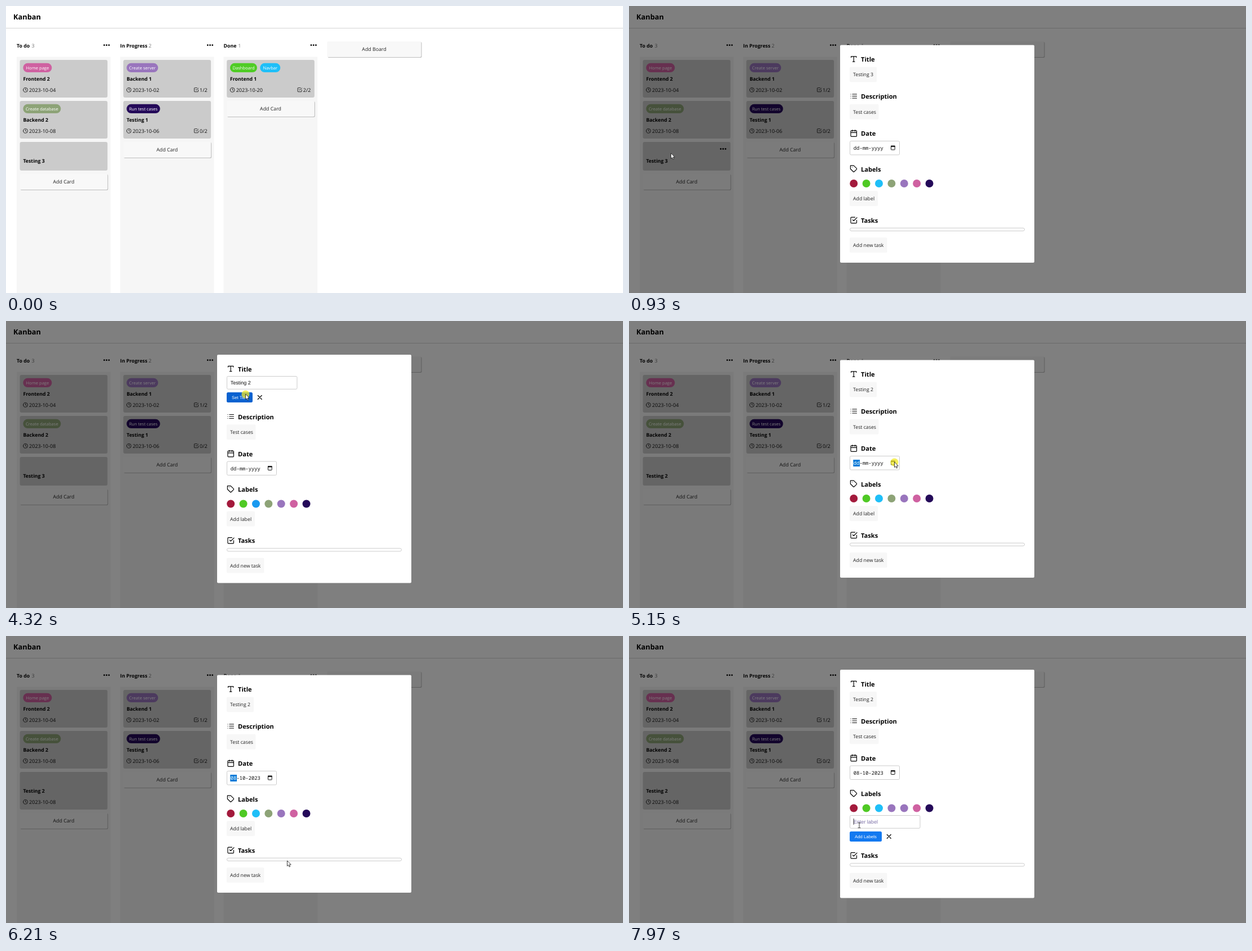
These frames come from a looping animation (1096 by 511 pixels, 8000 ms). An HTML page:

```html
<!DOCTYPE html>
<html lang="en">
<head>
<meta charset="utf-8">
<title>Kanban</title>
<style>
html, body { margin: 0; width: 100%; height: 100%; overflow: hidden; background: #fff; }
svg { display: block; width: 100vw; height: 100vh; }
text { font-family: "Open Sans", "Noto Sans", sans-serif; text-rendering: geometricPrecision; white-space: pre; }
.arial { font-family: "Liberation Sans", Arial, sans-serif; }
.mono { font-family: "Noto Sans Mono", "DejaVu Sans Mono", monospace; }
.icon { fill: none; stroke: #000; stroke-width: 2; stroke-linecap: round; stroke-linejoin: round; }
</style>
</head>
<body>
<svg id="stage" viewBox="0 0 1096 511" preserveAspectRatio="none"></svg>
<script>
const LOOP = 8000;
const COLORS = ['#a31a3c', '#4fc924', '#1fbff8', '#8da377', '#9975bd', '#cf61a1', '#240959'];
const ICONS = {
  type: 'M4 7V4H20V7M9 20H15M12 4V20',
  list: 'M8 6H21M8 12H21M8 18H21M3 6h.01M3 12h.01M3 18h.01',
  calendar: 'M5 4H19a2 2 0 0 1 2 2V20a2 2 0 0 1-2 2H5a2 2 0 0 1-2-2V6a2 2 0 0 1 2-2zM16 2V6M8 2V6M3 10H21',
  tag: 'M20.6 13.4l-7.2 7.2a2 2 0 0 1-2.8 0L2 12V2H12l8.6 8.6a2 2 0 0 1 0 2.8zM7 7h.01',
  check: 'M9 11l3 3L22 4M21 12v7a2 2 0 0 1-2 2H5a2 2 0 0 1-2-2V5a2 2 0 0 1 2-2h11',
  clock: 'M2 12a10 10 0 1 0 20 0a10 10 0 1 0-20 0M12 6v6l4 2',
  close: 'M18 6L6 18M6 6L18 18'
};

// Event times in ms
const T = {
  enter: 30, openCard: 930, editTitle: 1890, erase: 2650, retype: 2850,
  saveTitle: 4360, focusDate: 5090, openPicker: 5220, pick: 6060, editLabel: 7720
};
const CLICKS = [[860, 930], [1820, 1890], [4260, 4360], [5090, 5220], [5990, 6060], [7640, 7720]];

// Pointer moves: start, end, two Bezier handles (optional), destination
const START = [1004, 506];
const MOVES = [
  [30, 660, [650, 330], [330, 160], [74.5, 262]],
  [945, 1660, [180, 240], [330, 110], [432, 125]],
  [2090, 2140, [435.5, 126]],
  [3800, 4040, [425.5, 130]],
  [4360, 5020, [471.5, 251]],
  [5220, 5610, [407, 333]],
  [6060, 6210, [499.5, 400]],
  [6300, 6780, [436, 352]],
  [6800, 7510, [425, 320], [395, 295], [409, 337]]
];

const within = (t, a, b) => t >= a && t < b;

function pointer(t) {
  let from = START;
  for (const [a, b, ...path] of MOVES) {
    const to = path[path.length - 1];
    if (t < a) break;
    if (t < b) {
      const u = (t - a) / (b - a), s = u * u * (3 - 2 * u), r = 1 - s;
      return [0, 1].map(k => path.length === 1
        ? from[k] * r + to[k] * s
        : r * r * r * from[k] + 3 * r * r * s * path[0][k] + 3 * r * s * s * path[1][k] + s * s * s * to[k]);
    }
    from = to;
  }
  return from;
}

// Drawing helpers; text is placed by the middle of its capitals
const rect = (x, y, w, h, fill, r = 0, more = '') =>
  `<rect x="${x}" y="${y}" width="${w}" height="${h}" rx="${r}" fill="${fill}" ${more}/>`;
const text = (x, y, size, str, more = '') =>
  `<text x="${x}" y="${y + size * 0.36}" font-size="${size}" ${more}>${str}</text>`;
const bold = (x, y, size, str) => text(x, y, size, str, 'font-weight="700"');
const mid = (x, y, size, str, more = '') => text(x, y, size, str, 'text-anchor="middle" ' + more);
const disc = (x, y, r, fill) => `<circle cx="${x}" cy="${y}" r="${r}" fill="${fill}"/>`;
const icon = (name, x, y, size) =>
  `<path class="icon" d="${ICONS[name]}" transform="translate(${x - size / 2} ${y - size / 2}) scale(${size / 24})"/>`;
const dots = (x, y) => [-4.2, 0, 4.2].map(d => disc(x + d, y, 1.4, '#000')).join('');

const button = (x, y, w, label) =>
  rect(x + 1, y + 1, w, 28, '#bdbdbd', 2) + rect(x, y, w, 28, '#f8f8f8', 2) +
  mid(x + w / 2, y + 14, 8.8, label, 'fill="#222"');

function card(x, y, { title, date, tasks, tags = [] }, [px, py], hovering) {
  const h = date ? 67 : 51;
  let out = rect(x, y, 155.7, h, '#cbcbcb', 3);
  let tx = x + 5.8;
  for (const [label, w, color] of tags) {
    out += rect(tx, y + 5.8, w, 16.2, color, 8.1) + mid(tx + w / 2, y + 14.3, 7.6, label, 'fill="#fff"');
    tx += w + 5.3;
  }
  out += bold(x + 5.8, y + 34, 8.75, title);
  if (date) out += icon('clock', x + 10, y + 53.4, 9.3) + text(x + 16.5, y + 53.5, 9.05, date, 'fill="#111"');
  if (tasks) out += icon('check', x + 129.5, y + 53.2, 9.3) +
    text(x + 149.3, y + 53.5, 9.05, tasks, 'text-anchor="end" fill="#111"');
  if (hovering && px > x && px < x + 155.7 && py > y && py < y + h) out += dots(x + 142.6, y + 12.5);
  return [out, h];
}

function board(t, pos) {
  const columns = [
    ['To do', 26.5, [
      { title: 'Frontend 2', date: '2023-10-04', tags: [['Home page', 51, COLORS[5]]] },
      { title: 'Backend 2', date: '2023-10-08', tags: [['Create database', 67, COLORS[3]]] },
      { title: t < T.saveTitle ? 'Testing 3' : 'Testing 2', date: t < T.pick ? '' : '2023-10-08' }
    ]],
    ['In Progress', 50.5, [
      { title: 'Backend 1', date: '2023-10-02', tasks: '1/2', tags: [['Create server', 56, COLORS[4]]] },
      { title: 'Testing 1', date: '2023-10-06', tasks: '0/2', tags: [['Run test cases', 59.5, COLORS[6]]] }
    ]],
    ['Done', 25.7, [
      { title: 'Frontend 1', date: '2023-10-20', tasks: '2/2', tags: [['Dashboard', 48, '#4fcc25'], ['Navbar', 36, COLORS[2]]] }
    ]]
  ];
  let out = rect(0, 0, 1096, 511, '#fff') + bold(13, 19.7, 12.8, 'Kanban') + rect(0, 39, 1096, 1, '#d4d4d4');
  columns.forEach(([name, countX, cards], i) => {
    const x = 19 + i * 183.8;
    out += bold(x, 71, 8.75, name) + text(x + countX, 71, 9, cards.length, 'fill="#777"') + dots(x + 159.7, 69.7);
    out += rect(x, 90.5, 166.7, 421, '#f6f6f6');
    let y = 96;
    for (const c of cards) {
      const [svg, h] = card(x + 5.6, y, c, pos, within(t, T.enter, 960));
      out += svg;
      y += h + 6;
    }
    out += button(x + 5.6, y, 155.7, 'Add Card');
  });
  return out + button(570.5, 63, 167, 'Add Board');
}

const heading = (name, y, label) => icon(name, 399.2, y - 0.7, 14) + bold(412, y, 11.1, label);
const field = (y, w, label) => rect(392, y, w, 27, '#f7f7f7', 2) + text(398, y + 13.7, 8.75, label, 'fill="#222"');

function form(y, value, ink, caretX, action, w, hovered) {
  return rect(392.5, y + 0.5, 124.5, 22.8, '#fff', 2, 'stroke="#ccc"') +
    text(398.7, y + 11.4, 9.05, value, `class="arial" fill="${ink}"`) +
    (caretX ? rect(caretX, y + 6, 0.8, 11, '#000') : '') +
    rect(392, y + 29, w, 18, hovered ? '#0a62d0' : '#1379f0', 2.5) +
    mid(392 + w / 2, y + 38, 7.76, action, 'class="arial" fill="#fff"') +
    icon('close', 392 + w + 12.8, y + 38, 14);
}

function picker() {
  const left = 392, top = 267, ink = 'fill="#222"';
  let out = rect(left - 1.5, top, 146, 178, '#000', 3, 'opacity=".1"') +
    rect(left, top, 143, 176, '#fff', 2, 'stroke="#bbb" stroke-width=".7"') +
    text(399, 279, 7, 'October 2023', 'font-weight="600" fill="#222"') +
    '<path d="M448 278h4l-2 2.6z"/>' +
    '<path class="icon" style="stroke-width:1" d="M511 282v-6m-2.5 2.5l2.5-2.5 2.5 2.5M525 276v6m-2.5-2.5l2.5 2.5 2.5-2.5"/>';
  ['Su', 'Mo', 'Tu', 'We', 'Th', 'Fr', 'Sa'].forEach((d, c) => out += mid(406 + c * 19.2, 297, 6.8, d, ink));
  for (let i = 0; i < 42; i++) {
    const x = 406 + i % 7 * 19.2, y = 314 + Math.floor(i / 7) * 18;
    if (i === 1) out += rect(x - 8, y - 8, 16, 16, '#fff', 2, 'stroke="#1a73e8"');
    out += mid(x, y, 6.8, i < 31 ? i + 1 : i - 30, `fill="${i < 31 ? '#222' : '#999'}"`);
  }
  return out + text(399, 431, 6.8, 'Clear', 'fill="#1a73e8"') +
    text(528, 431, 6.8, 'Today', 'fill="#1a73e8" text-anchor="end"');
}

function modal(t, pos) {
  const titleOpen = within(t, T.editTitle, T.saveTitle), labelOpen = t >= T.editLabel;
  const grow = titleOpen || labelOpen ? 9.5 : 0;
  const up = -grow, down = grow, middle = titleOpen ? down : up;
  const title = 'Testing ' + (t < T.erase ? '3' : t < T.retype ? '' : '2');
  const caret = within(t, T.editTitle, 2430) || within(t, T.retype, 3370) || within(t, 3900, 4260);
  let out = rect(375, 69.5 + up, 345, 387.5 + 2 * grow, '#fff', 2);

  out += heading('type', 95.2 + up, 'Title');
  out += titleOpen
    ? form(98, title, '#111', caret && 435.3, 'Set Title', 46, pos[1] > 127 && pos[0] < 438)
    : field(108.5 + up, 48, title);

  out += heading('list', 161.2 + middle, 'Description') + field(174.7 + middle, 51.5, 'Test cases');

  const focused = within(t, T.focusDate, 7640);
  const [day, rest] = t < T.pick ? ['dd', '-mm-yyyy'] : ['08', '-10-2023'];
  const dy = 253 + middle;
  out += heading('calendar', 227.3 + middle, 'Date') +
    rect(392.5, dy - 12.5, 88, 24.5, '#fff', 2, 'stroke="#ccc"') +
    (focused ? rect(398.3, dy - 6, 11.7, 12, '#0078d7') : '') +
    text(398.8, dy, 8.85, `<tspan fill="${focused ? '#fff' : '#111'}">${day}</tspan>${rest}`, 'class="mono" fill="#111"') +
    rect(465.5, dy - 3.8, 6.7, 6.8, 'none', 0.6, 'stroke="#111" stroke-width="1"') +
    rect(465, dy - 4.3, 7.7, 2.2, '#111');

  out += heading('tag', 290.7 + middle, 'Labels');
  COLORS.forEach((c, i) => {
    if (titleOpen && i === 2) c = '#1a9af0';
    if (labelOpen && i === 3) c = COLORS[4];
    out += disc(399.2 + i * 22.4, 316 + middle, 7, c);
  });
  out += labelOpen
    ? form(319, 'Enter label', '#7d72a8', 398.7, 'Add Labels', 57, false)
    : field(329.3 + middle, 50, 'Add label');

  out += heading('check', 382 + down, 'Tasks') +
    rect(392.5, 395.3 + down, 310, 5.2, '#fff', 2.6, 'stroke="#ccc"') +
    field(412.3 + down, 66.5, 'Add new task');
  return out;
}

function cursor(t, [x, y]) {
  const at = `transform="translate(${x} ${y})"`;
  if (t >= T.editLabel)
    return `<path ${at} fill="none" stroke="#222" stroke-width=".9" d="M-2.3-4.5H-.6L0-4 .6-4.5H2.3M0-4V4M-2.3 4.5H-.6L0 4 .6 4.5H2.3"/>`;
  const glow = CLICKS.some(([a, b]) => within(t, a, b))
    ? `<circle cx="${x}" cy="${y + 0.5}" r="7" fill="#f0e828" opacity=".75"/>` : '';
  return glow + `<path ${at} fill="#fff" stroke="#111" stroke-width=".8" stroke-linejoin="round" d="M0 0V9.7L2.2 7.7 3.7 11.1 5.2 10.4 3.8 7.1H6.8Z"/>`;
}

function scene(t) {
  const pos = pointer(t);
  let out = board(t, pos);
  if (t >= T.openCard) out += rect(0, 0, 1096, 511, '#000', 0, 'opacity=".5"') + modal(t, pos);
  if (within(t, T.openPicker, T.pick)) out += picker();
  return t < T.enter ? out : out + cursor(t, pos);
}

const stage = document.getElementById('stage');
const began = performance.now();
let shown = '';

function tick() {
  const svg = scene((performance.now() - began) % LOOP);
  if (svg !== shown) stage.innerHTML = shown = svg;
  requestAnimationFrame(tick);
}
tick();
</script>
</body>
</html>
```
